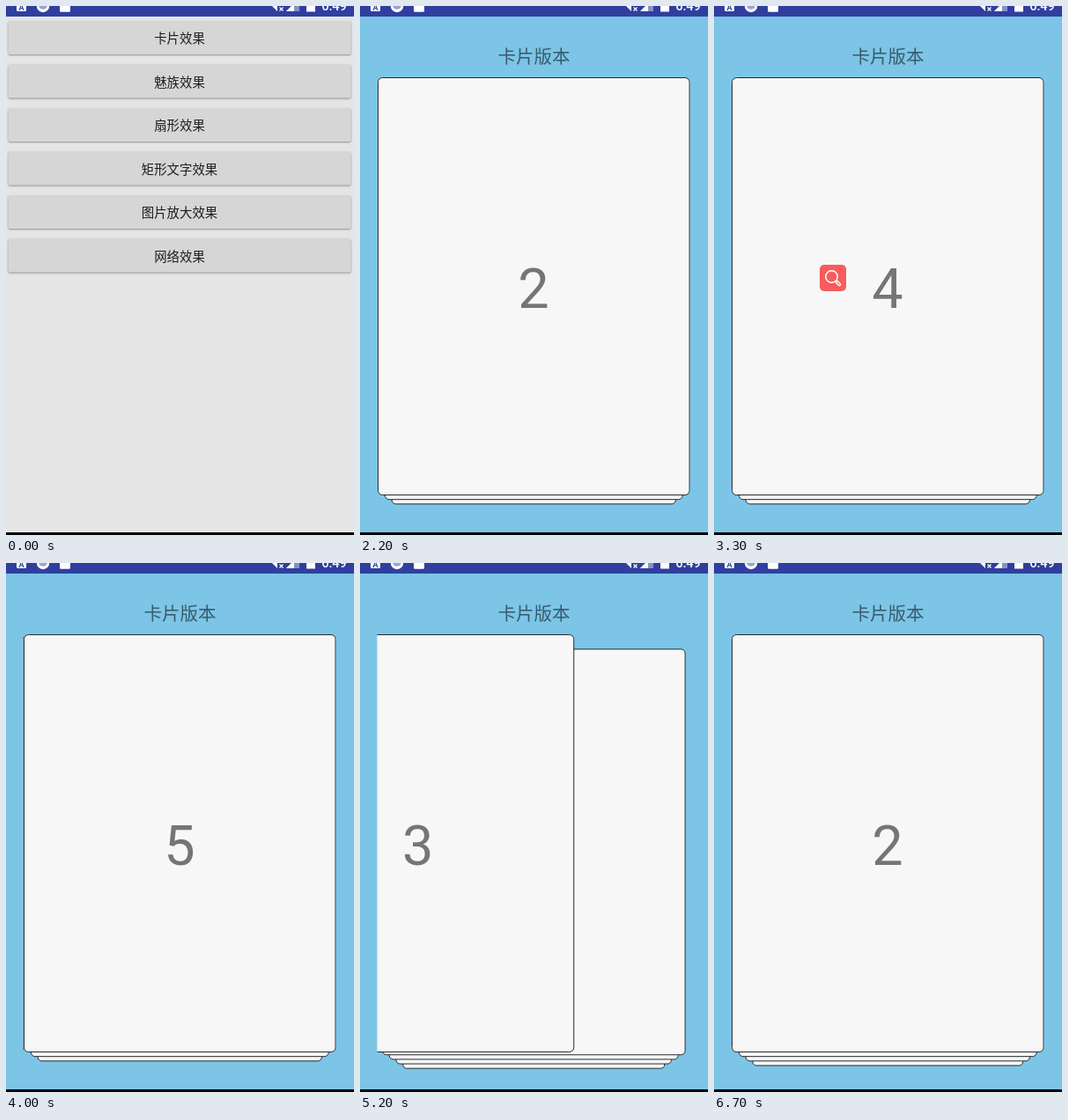
Animation of 395 by 601 pixels, one loop 7.2 s. Source, as an HTML page with a canvas:

```html
<!DOCTYPE html>
<html lang="zh-CN">
<head>
<meta charset="utf-8">
<title>卡片效果</title>
<style>
  html, body { margin: 0; width: 100%; height: 100%; overflow: hidden; background: #000; }
  canvas { position: absolute; left: 0; top: 0; display: block; }
</style>
</head>
<body>
<canvas id="menu" width="395" height="601"></canvas>
<canvas id="pager" width="395" height="601"></canvas>
<script>
const W = 395, H = 601, LOOP = 7200, STEP = 100;
const BAR = 12, FLOOR = 598;
const CJK = '"Noto Sans CJK SC", "Noto Sans", sans-serif';
const LABELS = ['卡片效果', '魅族效果', '扇形效果', '矩形文字效果', '图片放大效果', '网络效果'];
const CARD = { x: 20.5, y: 81.5, w: 353.5, h: 474, offset: 15.6 };

// Swipes between pages: start, end, from, to
const SWIPES = [
  [1540, 2200, 1, 2], [2220, 2750, 2, 3], [2750, 3300, 3, 4], [3440, 4050, 4, 5],
  [4150, 4750, 5, 4], [4860, 5700, 4, 3], [5940, 6650, 3, 2]
];
// Highest page kept behind the front one, valid until the given time
const LOADED = [[2220, 4], [2750, 5], [3440, 6], [4080, 7], [4800, 8], [5800, 7], [6700, 6], [LOOP, 5]];

const menuCtx = document.getElementById('menu').getContext('2d');
const pagerCanvas = document.getElementById('pager');
const pagerCtx = pagerCanvas.getContext('2d');

const clamp01 = v => Math.min(1, Math.max(0, v));
const swipeEase = u => 1 - (1 - Math.pow(u, 1.4)) ** 3;

function rounded(c, x, y, w, h, r) {
  c.beginPath();
  c.roundRect(x, y, w, h, r);
}

function polygon(c, color, ...points) {
  c.fillStyle = color;
  c.beginPath();
  points.forEach(([x, y]) => c.lineTo(x, y));
  c.fill();
}

function label(c, text, x, y, font, color) {
  c.font = font;
  c.fillStyle = color;
  c.textAlign = 'center';
  c.textBaseline = 'alphabetic';
  c.fillText(text, x, y);
}

function drawStatusBar(c) {
  c.fillStyle = '#303f9f';
  c.fillRect(0, 0, W, BAR);
  c.fillStyle = '#fff';
  rounded(c, 12, -6, 11, 12, 1.5);
  c.fill();
  label(c, 'A', 17.5, 5, 'bold 9px Roboto, sans-serif', '#303f9f');
  c.fillStyle = '#fff';
  c.beginPath();
  c.arc(42, 0, 7.2, 0, 7);
  c.fill();
  c.fillStyle = '#9aa2d0';
  c.beginPath();
  c.arc(42, -1, 4.8, 0, 7);
  c.fill();
  c.fillStyle = '#fff';
  rounded(c, 61, -6, 12, 12.8, 1.5);
  c.fill();

  polygon(c, '#fff', [298, -4], [308, -4], [308, 6]);
  c.strokeStyle = '#fff';
  c.lineWidth = 1.2;
  c.beginPath();
  c.moveTo(310.5, 1.5); c.lineTo(314.5, 5.5);
  c.moveTo(314.5, 1.5); c.lineTo(310.5, 5.5);
  c.stroke();
  polygon(c, '#8790c8', [318, 6], [333, 6], [333, -9]);
  polygon(c, '#fff', [318, 6], [327, 6], [327, -3]);
  c.fillStyle = '#fff';
  c.fillRect(341, -8, 10, 14.5);
  label(c, '6:49', 372.5, 5, '500 14.5px Roboto, sans-serif', '#fff');
}

function drawMenu(c, t) {
  c.fillStyle = '#e5e5e5';
  c.fillRect(0, 0, W, H);
  LABELS.forEach((text, i) => {
    const y = 17 + i * 49.5;
    c.save();
    c.shadowColor = 'rgba(0,0,0,.38)';
    c.shadowBlur = 2;
    c.shadowOffsetY = 1;
    c.fillStyle = '#d6d6d6';
    rounded(c, 2.5, y, 389, 38, 2);
    c.fill();
    c.restore();
    if (i === 0 && t >= 600 && t < 1000) drawRipple(c, y, (t - 500) / 300);
    label(c, text, 197, y + 25, '14.4px ' + CJK, '#1d1d1d');
  });
  drawStatusBar(c);
  c.fillStyle = '#000';
  c.fillRect(0, FLOOR, W, H - FLOOR);
}

function drawRipple(c, y, u) {
  c.save();
  rounded(c, 2.5, y, 389, 38, 2);
  c.clip();
  c.fillStyle = 'rgba(0,0,0,.1)';
  c.beginPath();
  c.arc(197, y + 19, 200 * clamp01(u), 0, 7);
  c.fill();
  c.restore();
}

function drawCard(c, page, position) {
  const depth = Math.max(0, position);
  const scale = 1 - CARD.offset * depth / CARD.w;
  const w = CARD.w * scale, h = CARD.h * scale;
  const cx = CARD.x + CARD.w / 2 + Math.min(0, position) * (CARD.w + 1);
  const cy = CARD.y + CARD.h / 2 + CARD.offset * depth;
  rounded(c, cx - w / 2, cy - h / 2, w, h, 5 * scale);
  c.fillStyle = '#f7f7f7';
  c.fill();
  c.strokeStyle = '#262a2c';
  c.lineWidth = 1;
  c.stroke();
  label(c, page, cx - 0.3, cy + 24.7 * scale, `${63 * scale}px Roboto, sans-serif`, '#757575');
}

function drawSearchBadge(c) {
  c.fillStyle = '#f85c5c';
  rounded(c, 120, 294, 30, 30, 5);
  c.fill();
  c.strokeStyle = '#fff';
  c.lineWidth = 1.5;
  c.beginPath();
  c.arc(133.5, 307.5, 6.7, 0, 7);
  c.stroke();
  c.lineCap = 'round';
  c.lineWidth = 4;
  c.beginPath();
  c.moveTo(139.8, 313.8);
  c.lineTo(142.3, 316.3);
  c.stroke();
  c.strokeStyle = '#f85c5c';
  c.lineWidth = 1.2;
  c.stroke();
}

function scrollAt(t) {
  let page = 1;
  for (const [start, end, from, to] of SWIPES) {
    if (t >= start) page = from + (to - from) * swipeEase(clamp01((t - start) / (end - start)));
  }
  return page;
}

function drawPager(c, t) {
  const enter = clamp01((t - 700) / 300);
  const rise = 46 * (1 - enter) ** 3;
  pagerCanvas.style.opacity = 1 - (1 - enter) ** 2;
  c.clearRect(0, 0, W, H);
  if (!enter) return;

  c.save();
  c.beginPath();
  c.rect(0, BAR, W, FLOOR - BAR);
  c.clip();
  c.translate(0, rise);
  c.fillStyle = '#7cc5e7';
  c.fillRect(0, BAR, W, H);
  label(c, '卡片版本', 197.5, 64.6, '20.5px ' + CJK, '#395b6a');

  c.beginPath();
  c.rect(19.5, 81, 355.2, 500);
  c.clip();
  const scroll = scrollAt(t);
  const last = LOADED.find(([until]) => t < until)[1];
  for (let page = last; page > scroll - 1; page--) drawCard(c, page, page - scroll);
  if (t >= 3300 && t < 3500) drawSearchBadge(c);
  c.restore();
}

function frame() {
  const t = Math.floor(performance.now() % LOOP / STEP) * STEP;
  drawMenu(menuCtx, t);
  drawPager(pagerCtx, t);
  requestAnimationFrame(frame);
}
frame();
</script>
</body>
</html>
```
